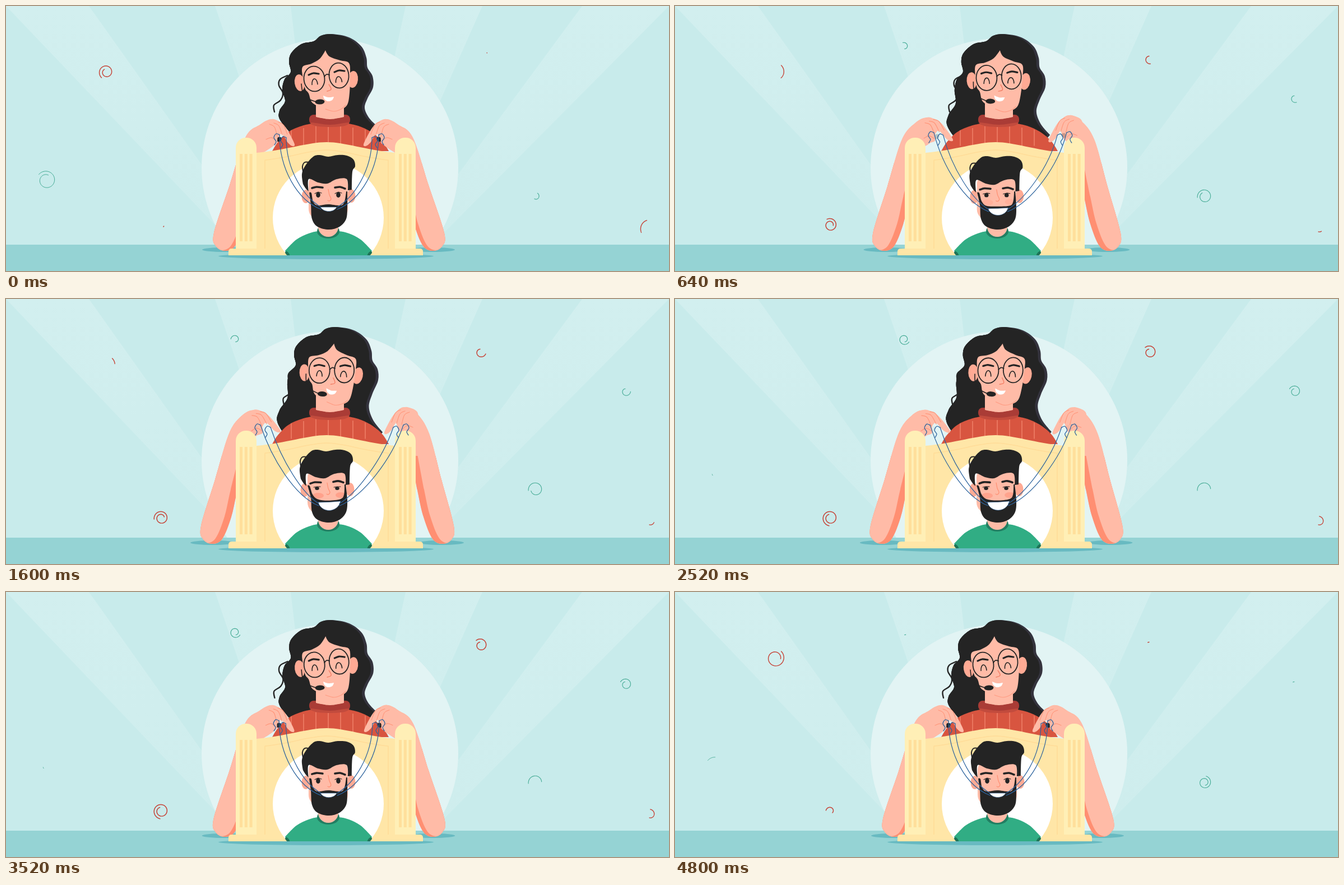
Write an HTML page with a canvas that moves like this. It is 1183 px wide and 473 px high and loops after 4.84 s.

```html
<!DOCTYPE html>
<html lang="en">
<head>
<meta charset="utf-8">
<title>Puppet smile</title>
<style>
html, body { margin: 0; width: 100%; height: 100%; overflow: hidden; background: #c8ebeb; }
canvas { display: block; width: 1183px; height: 473px; }
</style>
</head>
<body>
<canvas id="stage" width="1183" height="473"></canvas>
<script>
const c = document.getElementById('stage').getContext('2d');
const LOOP = 4840, AXIS = 576.5;
const SKIN = '#ffbba7', EAR = '#ffaa94', SHADE = '#ff8f72', INK = '#242424';
const CREAM = '#ffe6a7', GROOVE = '#ffdf9b', BLUE = '#2c639d', SHADOW = '#68bac1';
const RED = '#c64236', GREEN = '#45ab95';

const lerp = (a, b, k) => a + (b - a) * k;
const clamp = x => Math.max(0, Math.min(1, x));

// "x,y x,y!" to points; "!" marks a sharp corner
const P = s => s.split(' ').map(v => [...v.replace('!', '').split(',').map(Number), v.endsWith('!')]);

// cubic-bezier easing through (x1,0) and (x2,1)
function ease(x, x1, x2) {
  x = clamp(x);
  let lo = 0, hi = 1, u;
  for (let i = 0; i < 24; i++) {
    u = (lo + hi) / 2;
    const v = 1 - u;
    if (3 * v * v * u * x1 + 3 * v * u * u * x2 + u * u * u < x) lo = u; else hi = u;
  }
  return 3 * (1 - u) * u * u + u * u * u;
}

// Smooth curve through points
function curve(p, closed) {
  const n = p.length;
  const at = i => closed ? p[(i + n) % n] : p[Math.max(0, Math.min(n - 1, i))];
  const slope = (i, k) => at(i)[2] ? 0 : (at(i + 1)[k] - at(i - 1)[k]) / 6;
  c.beginPath();
  c.moveTo(p[0][0], p[0][1]);
  for (let i = 0; i < (closed ? n : n - 1); i++) {
    const a = at(i), b = at(i + 1);
    c.bezierCurveTo(a[0] + slope(i, 0), a[1] + slope(i, 1),
      b[0] - slope(i + 1, 0), b[1] - slope(i + 1, 1), b[0], b[1]);
  }
}
function paint(color) { c.fillStyle = color; c.fill(); }
function ink(color, w) { c.strokeStyle = color; c.lineWidth = w; c.stroke(); }
function fill(p, color) { curve(p, true); paint(color); }
function line(p, color, w) { curve(p, false); ink(color, w); }
function oval(x, y, rx, ry, color, rot = 0) {
  c.beginPath(); c.ellipse(x, y, rx, ry, rot, 0, 7); paint(color);
}
function ring(x, y, rx, ry, rot) {
  c.beginPath(); c.ellipse(x, y, rx, ry, rot, 0, 7); ink(INK, 1.8);
}
function arch(x, y, rx, ry, rot, color, w) {
  c.beginPath(); c.ellipse(x, y, rx, ry, rot, Math.PI, 2 * Math.PI); ink(color, w);
}
function box(x, y, w, h, r, color) {
  c.beginPath(); c.roundRect(x, y, w, h, r); paint(color);
}
function group(x, y, rot, dx, dy, draw) {
  c.save();
  c.translate(x + dx, y + dy); c.rotate(rot); c.translate(-x, -y);
  draw();
  c.restore();
}
function mirrored(draw) {
  c.save();
  c.translate(2 * AXIS, 0); c.scale(-1, 1);
  draw();
  c.restore();
}

function backdrop() {
  c.fillStyle = '#c8ebeb'; c.fillRect(0, 0, 1183, 473);
  const g = c.createLinearGradient(0, 0, 0, 426);
  g.addColorStop(0, '#d2efef'); g.addColorStop(1, '#ceeded');
  for (const [a, b] of [[0, 148], [373, 508], [713, 850], [1028, 1183]]) {
    c.beginPath(); c.moveTo(a, 0); c.lineTo(b, 0); c.lineTo(580, 608); paint(g);
  }
  oval(578, 288, 229, 230, '#e2f4f4');
  c.fillStyle = '#95d3d4'; c.fillRect(0, 426, 1183, 47);
}

// Spiral whose outer end is drawn first, then erased; repeats every second
function curl(t, x, y, r, a0, birth, color, w) {
  const turn = s => (1 - Math.sqrt(1 - 0.8775 * s)) / 0.65;
  const age = (t - birth + 2000) % 1000;
  const from = turn(ease((age - 310) / 590, 0.33, 0.3));
  const to = turn(ease(age / 570, 0.33, 0.3));
  if (to - from < 0.0005) return;
  c.beginPath();
  for (let i = 0; i <= 50; i++) {
    const u = lerp(from, to, i / 50), a = a0 + u * 11.6, d = r * (1 - 0.65 * u);
    c.lineTo(x + d * Math.cos(a), y + d * Math.sin(a));
  }
  ink(color, w);
}
function confetti(t) {
  curl(t, 179, 118, 16, -0.85, 515, RED, 1.4);
  curl(t, 277, 391, 14, 1.6, 170, RED, 1.5);
  curl(t, 72, 311, 17, 3.8, 705, GREEN, 1);
  curl(t, 409, 72, 13, 2.4, 0, GREEN, 1.2);
  curl(t, 847, 95, 16, -0.8, 990, RED, 1.5);
  curl(t, 1106, 165, 14, -0.8, 0, GREEN, 1.1);
  curl(t, 945, 340, 13, 3, 350, GREEN, 1.1);
  curl(t, 1149, 397, 17, 2.7, 875, RED, 1.4);
}

const hair = P('549,63 562,53 582,50 612,56 634,72 643,92 645,110 654,125 655,145 645,165 640,182 648,200 664,216! 640,240! 520,240! 490,205 488,187 498,170 493,150 497,131 508,118 505,100 509,84 527,68');
const lock = P('502,124 489,131 487,142 494,155 490,168 478,177 479,189');
const hairFace = P('570,79! 577,90 596,97 612,102 614,125 613,155 609,176 597,185 580,186 562,181 546,172 540,156 534,148 530,130 529,109 545,103 560,94');

function womanHair(q) {
  // upper hair follows the head, tips swing outward and down
  const p = hair.map(([x, y, sharp]) => {
    const b = clamp((y - 150) / 60);
    return [x + q * (9 - 8 * b + (x - 574) * 0.08 * b), y + q * Math.max(0, y - 150) * 0.33, sharp];
  });
  line(lock.map(([x, y]) => [x + 17 * q, y]), INK, 2.4);
  curve(p, true);
  c.save();
  paint('#34333d'); c.clip();
  c.translate(-5, 0);
  curve(p, true); paint(INK);
  c.fillRect(460, 60, 105, 200);
  c.restore();
}

function womanBody() {
  box(553, 160, 50, 48, 0, SKIN);
  fill(P('475,259! 485,243 502,226 522,216 545,210 578,207 611,210 634,216 655,227 672,242 683,259!'), '#d85540');
  for (let x = 509; x < 645; x += 22) {
    c.beginPath(); c.moveTo(x, 211 + Math.abs(x - 578) * 0.16); c.lineTo(x, 249);
    ink('#f48870', 1.3);
  }
  box(541, 194, 73, 18, 8, '#aa3c36');
  fill(P('545,208 578,212 611,208 604,214 578,216 552,214'), '#c24b3d');
  fill(P('553,188! 603,188! 603,198! 578,202 553,198!'), SKIN);
}

function womanHead(q) {
  group(574, 206, 0.12 * q, 0, 0, () => {
    oval(524, 137, 9, 15, EAR, -0.15);
    oval(619, 131, 9, 15, EAR, 0.1);
    fill(hairFace, SKIN);
    line(P('570,184 585,188 598,184 606,177'), '#ff9b82', 1.1);
    line(P('527,139 529,152 536,164 553,171'), INK, 1.6);
    oval(560, 171, 8.5, 4.5, INK, -0.05);
    for (const [x, y] of [[549, 122], [595, 117]])
      line([[x - 9, y + 1], [x - 1, y - 2], [x + 9, y - 1]], INK, 3.2);
    arch(551, 140, 5, 10, -0.08, INK, 1.6);
    arch(594, 136, 5.5, 10, -0.08, INK, 1.6);
    line(P('576,140 580,147 579,150 573,152'), '#f27f65', 1.4);
    fill(P('566,160! 575,163 585,162! 582,168 574,170 568,166'), '#fff');
    ring(550, 130, 18.5, 22.5, -0.1);
    ring(594, 124, 17.5, 22.5, -0.1);
    line(P('568,126 572,122 577,123'), INK, 1.8);
  });
}

// Left arm: elbow, wrist and knuckles slide, the outline hangs on them
function arm(a, reach, lift) {
  const ex = 391 - reach * a, ey = 414, wx = 427 - 29 * a, wy = 235 + 5 * a;
  const kx = 475 - 32 * a, ky = 202 - lift * a;
  const p = [
    [kx, ky], [kx - 22, ky + 10], [wx, wy], [(wx + ex - 20) / 2, (wy + ey - 9) / 2],
    [ex - 20, ey - 9], [ex - 16, ey + 15], [ex, ey + 23], [ex + 18, ey + 14],
    [ex + 34, ey - 25], [ex + 45, ey - 73], [wx + 30 + 8 * a, wy + 28 - 18 * a, true],
    [kx + 10, ky + 40], [kx + 14, ky + 12]
  ];
  c.save();
  curve(p, true); paint(SKIN); c.clip();
  c.fillStyle = SHADE; c.fillRect(340, 280, 120, 160);
  c.translate(-7 - 5 * a, -1);
  curve(p, true); paint(SKIN);
  c.restore();
}

const palm = P('455,213 474,202 487,206 497,214 506,228 515,247 511,250 503,244 493,229 485,234 482,246 463,243');
function hand(a, twist, reach, lift) {
  group(475, 202, -twist * a, -reach * a, -lift * a, () => {
    c.globalAlpha = 1 - a;
    oval(487, 238, 5, 4, INK, -0.5);
    c.globalAlpha = 1;
    fill(palm, SKIN);
    for (let i = 0; i < 3; i++) {
      const x = 470 + 8 * i, y = 211 - 2 * i;
      line([[x, y], [x + 9, y + 5], [x + 14 + i, y + 22]], SHADE, 1);
    }
    line(P('464,238 474,235 482,241'), SHADE, 1);
  });
}

// Thread with a loop round the finger, hanging to the mouth corner
function thread(a, x, y, ex, ey, slack) {
  line([[x - 9, y + 18], [x - 6, y + 12], [x - 10, y + 5], [x - 6, y - 2], [x, y]], BLUE, 1.3);
  c.beginPath();
  c.moveTo(x, y);
  c.bezierCurveTo(x + 20 * a, y + 60, ex - slack, ey - 17, ex, ey);
  ink(BLUE, 1.2);
}
function threads(a, drift, q) {
  const x = 488 - 38 * a + drift * a, ex = 562 - 4 * q;
  thread(a, x, 230 - 5 * a, ex, 363 + 6 * q, 43);
  thread(a, x + 12 + 6 * a, 235 - 6 * a, ex, 359 + 6 * q, 29);
}

function booth() {
  c.beginPath();
  c.moveTo(447, 440); c.lineTo(447, 262);
  c.bezierCurveTo(500, 257, 540, 243, 572, 243);
  c.bezierCurveTo(604, 243, 642, 257, 695, 262);
  c.lineTo(695, 440); paint(CREAM);
  c.beginPath();
  c.moveTo(462, 433); c.lineTo(462, 275);
  c.bezierCurveTo(510, 270, 542, 257, 572, 257);
  c.bezierCurveTo(602, 257, 634, 270, 682, 275);
  c.lineTo(682, 433); ink('#ffdc98', 1.5);
  for (const x of [410, 694]) {
    box(x, 235, 37, 200, [18, 18, 0, 0], '#ffefb6');
    for (let i = 0; i < 3; i++) box(x + 7 + 8.8 * i, 264, 5, 156, 0, GROOVE);
  }
  box(397, 433, 347, 12, [5, 5, 0, 0], CREAM);
}

const manHair = P('530,318! 528,300 534,285 548,269 560,266 575,269 592,266 608,267 620,274 623,286 618,296 617,328! 610,329! 608,309 590,309 573,317 557,315 540,309 540,331! 535,326');
const beard = P('541,333! 545,334 548,349 556,356 575,354 597,356 604,349 607,331! 609,331! 609,358 607,380 595,394 576,399 556,394 546,380 544,355');

function shirt() {
  c.save();
  c.beginPath(); c.rect(470, 270, 210, 175); c.clip();
  oval(575, 378, 99, 99, '#fff');
  fill(P('498,437! 518,417 540,406 557,402 575,401 594,402 612,406 633,417 653,437! 645,446! 506,446!'), '#31ad84');
  for (const x of [502, 649]) oval(x, 442, 5, 2.5, '#1e7357', x < 575 ? 0.8 : -0.8);
  oval(575, 402, 20, 13, '#227e62');
  box(557, 385, 36, 27, [0, 0, 18, 18], SKIN);
  c.restore();
}

function man(q) {
  shirt();
  group(0, 0, 0, -2 * q, q, () => {
    oval(535, 340, 7.5, 12, EAR);
    oval(616, 339, 7.5, 12, EAR);
    box(540, 298, 70, 84, 20, SKIN);
    c.globalAlpha = q * q;
    oval(559, 350, 10, 5, '#ffa18b'); oval(599, 349, 9, 5, '#ffa18b');
    c.globalAlpha = 1;
    line(P('575,327 577,337 580,344 577,348 574,347'), SHADE, 1.2);
    for (const x of [557, 593]) {
      oval(x, 337, 3.8, lerp(5, 3, q), INK);
      line([[x - 6, 335], [x, 332 + 2 * q], [x + 6, 334]], INK, 1.1);
    }
  });
  group(0, 0, 0, -4 * q, 3 * q, () => {
    fill(manHair, INK);
    line(P('530,295 529,286 533,279 541,279'), INK, 2);
  });
  // moustache sags and sideburns lean as the smile grows
  fill(beard.map(([x, y, sharp]) => [
    x - 3 * q * clamp((355 - y) / 20),
    y + (y < 357 ? 6 * q * clamp(1 - Math.abs(x - 576) / 25) : 0), sharp]), INK);

  const l = 561 - 4 * q, r = 590 + 7 * q, y = 359 + 4 * q, ry = 359 + 2 * q;
  c.beginPath();
  c.moveTo(l, y);
  c.quadraticCurveTo(576, 359 + 4 * q, r, ry);
  c.bezierCurveTo(r - 5, 369 + 13 * q, l + 6, 369 + 14 * q, l, y);
  paint('#fff'); ink(BLUE, 0.6);

  group(574, 325, -0.05 * q, -3 * q, 3 * q, () => {
    line(P('546,325 554,323 565,324'), INK, 3.6);
    line(P('587,324 596,323 605,326'), INK, 3.6);
  });
}

function pose(t, dur, x2) {
  return t < 2385 ? ease(t / dur, 0.33, x2) : 1 - ease((t - 2385) / dur, 0.33, x2);
}

function draw(t) {
  const a = pose(t, 1470, 0.1);
  const q = pose(t, 1330, 0.4);
  c.lineCap = c.lineJoin = 'round';
  backdrop();
  confetti(t);
  oval(lerp(390, 369, q), 435, 40, 4, SHADOW);
  oval(lerp(761, 777, q), 435, 40, 4, SHADOW);
  oval(571, 446.5, 192, 5.5, SHADOW);
  womanHair(q);
  womanBody();
  womanHead(q);
  arm(a, 23, 4);
  hand(a, 0.19, 33, 4);
  mirrored(() => { arm(a, 17, 9); hand(a, 0, 37, 9); });
  booth();
  man(q);
  threads(a, 4, q);
  mirrored(() => threads(a, -6, q));
}

function frame() {
  draw(performance.now() % LOOP);
  requestAnimationFrame(frame);
}
frame();
</script>
</body>
</html>
```
